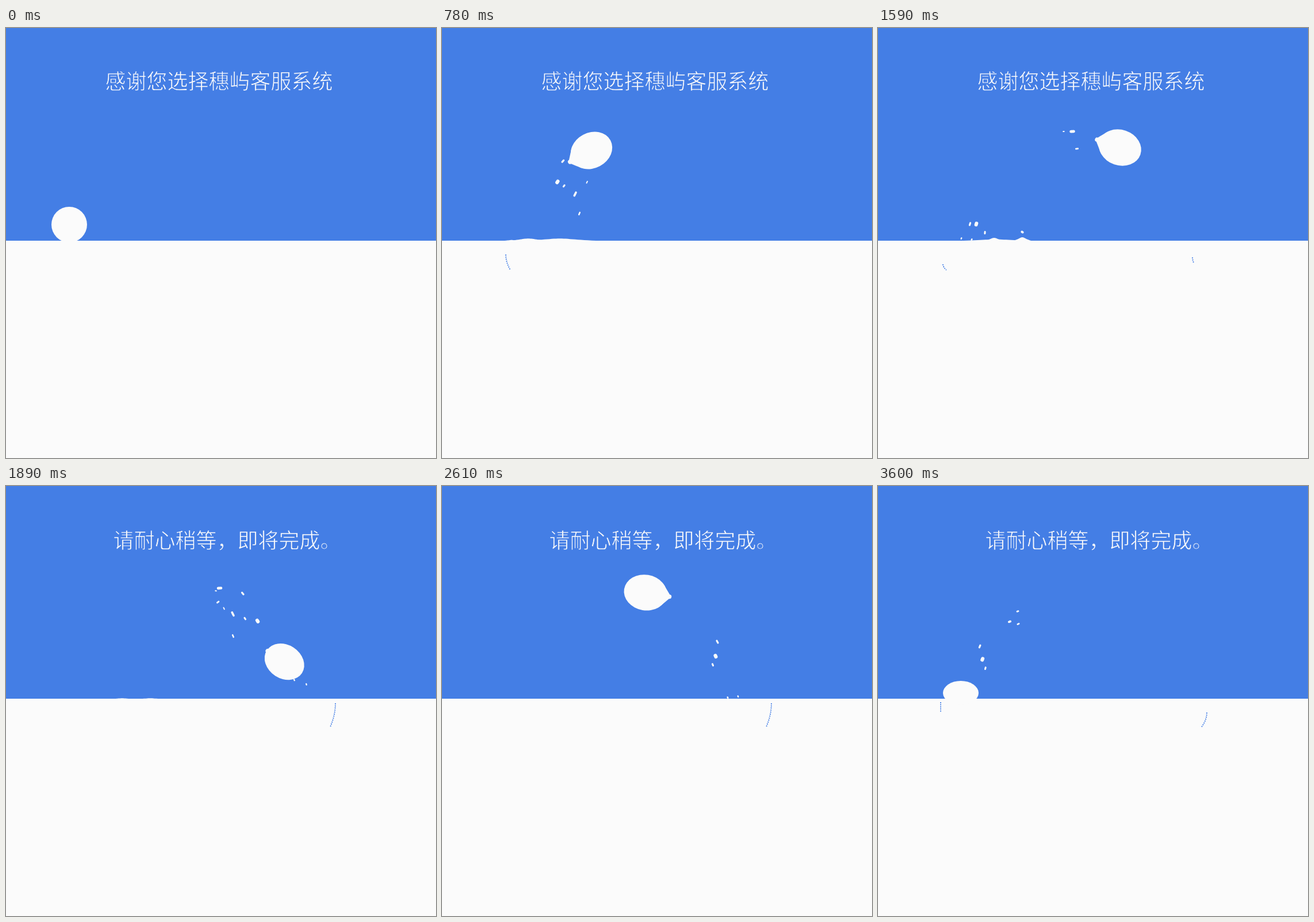
Write an HTML page with a canvas that moves like this. It is 748 px wide and 748 px high and loops after 3.63 s.

```html
<!DOCTYPE html>
<html lang="zh-CN">
<head>
<meta charset="utf-8">
<title>请稍等</title>
<style>
  html, body { margin: 0; width: 100%; height: 100%; overflow: hidden; background: #fbfbfb; }
  canvas, svg { position: absolute; left: 0; top: 0; width: 748px; height: 748px; }
  text {
    font: 300 36px "Noto Sans CJK SC", "Noto Sans CJK", "Noto Sans SC", sans-serif;
    fill: #fbfbfb; fill-opacity: .9;
  }
  .thin text { stroke: #447ee5; stroke-width: .8px; fill-opacity: 1; }
</style>
</head>
<body>
<canvas width="748" height="748"></canvas>
<svg viewBox="0 0 748 748">
  <text id="thanks" x="172.5" y="106">感谢您选择穗屿客服系统</text>
  <text id="wait" x="186.5" y="107.5">请耐心稍等，即将完成。</text>
</svg>
<script>
const BLUE = '#447ee5', WHITE = '#fbfbfb', LEVEL = 370, AXIS = 330, LOOP = 3630;
const ctx = document.querySelector('canvas').getContext('2d');
const thanks = document.getElementById('thanks'), wait = document.getElementById('wait');
const clamp = v => Math.max(0, Math.min(1, v));
const mix = (a, b, u) => a + (b - a) * u;

// smooth interpolation of all columns; straight on beyond the ends
function sample(keys, t) {
  const last = keys.length - 1;
  let i = 0;
  while (i < last - 1 && t >= keys[i + 1][0]) i++;
  const a = keys[i], b = keys[i + 1], p = keys[i - 1] || a, n = keys[i + 2] || b;
  const h = b[0] - a[0], u = (t - a[0]) / h;
  return a.slice(1).map((v, k) => {
    const c = k + 1, d = b[c] - v;
    if (u < 0 || u > 1) return v + d * u;
    const m0 = (b[c] - p[c]) / (b[0] - p[0]) * h;
    const m1 = (n[c] - v) / (n[0] - a[0]) * h;
    return v + u * (m0 + u * (3 * d - 2 * m0 - m1 + u * (m0 + m1 - 2 * d)));
  });
}

// step, x, y, tilt in degrees
const rightward = [
  [0, 110, 342, 0], [5, 107, 404, -40], [11, 138, 368, -56], [16, 180, 288, -50],
  [25, 260, 213, -28], [36, 338, 184, 0], [52, 421, 208, 19], [67, 517, 362, 40]
];

function ball(keys, t, tailFrom, side) {
  const first = keys[0][0], end = keys[keys.length - 1][0];
  if (t < first || t > end + 2) return;
  const [x, y, tilt] = sample(keys, t);
  const grow = clamp((t - first) / 6), land = clamp((end - t) / 6);
  const rx = mix(31, 37.5, grow * land), ry = mix(21, 31, land);
  const rot = tilt * Math.PI / 180 * clamp((end - t) / 2);
  ctx.beginPath();
  ctx.ellipse(x, y, rx, ry, rot, 0, 7);
  ctx.fill();

  const dist = 46 * clamp((t - tailFrom) / 8) * land;
  if (dist < 28) return;
  ctx.save();
  ctx.translate(x, y);
  ctx.rotate(rot);
  ctx.scale(side, 1);
  const r = 3.8, cx = r - dist;
  ctx.beginPath();
  ctx.moveTo(-rx * .74, -ry * .67);
  ctx.quadraticCurveTo(-rx, -ry * .3, cx, -r);
  ctx.arc(cx, 0, r, -Math.PI / 2, Math.PI / 2, true);
  ctx.quadraticCurveTo(-rx, ry * .3, -rx * .74, ry * .67);
  ctx.fill();
  ctx.restore();
}

const leftward = [
  [63, 545, 412, 60], [67, 524, 342, 58], [71, 480.5, 270, 45], [80, 401, 205, 25],
  [88, 340, 184, 5], [102, 256, 205, -20], [119, 144, 360, -40]
];

function stroke(x, y, a, len, width) {
  const dx = Math.cos(a) * len / 2, dy = Math.sin(a) * len / 2;
  ctx.lineWidth = width;
  ctx.beginPath();
  ctx.moveTo(x - dx, y - dy);
  ctx.lineTo(x + dx + .01, y + dy);
  ctx.stroke();
}

// each row: length, width, then one x, y pair per step
function drops(rows, steps, from, to, t, mirror) {
  if (t < from || t > to) return;
  ctx.save();
  if (mirror) ctx.transform(-1, 0, 0, 1, 2 * AXIS, 0);
  for (const [len, width, ...xy] of rows) {
    const count = xy.length / 2;
    if (count < steps.length && t > steps[count - 1] - 2) continue;
    const keys = steps.slice(0, count).map((s, i) => [s, xy[2 * i], xy[2 * i + 1]]);
    const [x, y] = sample(keys, t), [nx, ny] = sample(keys, t + .1);
    stroke(x, y, Math.atan2(ny - y, nx - x), len, width);
  }
  ctx.restore();
}

const spray = [
  [3, 2, 272, 230, 228, 315],
  [6, 3.6, 255, 243, 203, 345],
  [4, 2.6, 257, 280, 217, 375],
  [3, 3, 235, 244, 189, 311, 186, 356],
  [2.5, 6, 216, 245, 184, 296, 171, 341],
  [4, 3.2, 237, 201, 181, 271, 160, 341]
];
const splash = (t, mirror) => drops(spray, [16, 36, 52], 12, 60, t, mirror);

const beads = [[1.5, 2.6, 178, 338, 163, 368], [1.5, 2.4, 154, 347, 145, 366], [1.5, 2.4, 135, 354, 130, 372]];
const dribble = (t, mirror) => drops(beads, [36, 52], 28, 58, t, mirror);

const trailOut = [
  [5, 4.6, 242, 186, 338, 180, 396, 176],
  [3, 3, 257, 202, 346, 210, 382, 192],
  [1.5, 2, 242, 201, 323, 180, 401, 188]
];
const trailBack = [[2, 3, 312, 194, 243, 218], [2.5, 3.8, 311, 207, 229, 236], [2.5, 2.8, 297, 216, 244, 240]];

// loose drops: step, x, y, width
function strays(t) {
  for (const [s, x, y, w] of [
    [16, 147, 336, 4], [36, 226, 327, 4.6], [52, 251, 355, 4], [71, 344, 170, 5], [71, 514, 313, 6]
  ]) if (Math.abs(t - s) < 4) stroke(x, y + t - s, .6, 1.5, w);
}

function atLevel(u, trace) {
  if (u <= 0) return;
  ctx.save();
  ctx.translate(0, LEVEL);
  ctx.scale(1, u * (2 - u));
  ctx.beginPath();
  trace();
  ctx.fill();
  ctx.restore();
}

// column of liquid: l..r is its base, a and b bend the left flank, c and d the right one
function jet(t, peak, l, a, b, tip, height, c, d, r) {
  const u = 1 - Math.abs(t - peak) / (t < peak ? 6.5 : 9);
  atLevel(u, () => {
    ctx.moveTo(l, 1);
    ctx.bezierCurveTo(a, -3, b, -14, tip - 4, 3 - height);
    ctx.quadraticCurveTo(tip, -height - 3, tip + 4, 3 - height);
    ctx.bezierCurveTo(c, -height / 2, d, -3, r, 1);
  });
}

// ripples: peak step, x, height, half width
function ripples(t) {
  for (const [peak, x, h, w] of [
    [16, 121, 12, 15], [16, 163, 9, 12], [36, 116, 6, 14], [36, 150, 8, 48], [36, 205, 5, 90],
    [52, 202, 5, 24], [52, 251, 6, 22], [102, 202, 7, 16], [102, 482, 7, 18], [102, 397, 2, 22]
  ]) {
    atLevel(1 - Math.abs(t - peak) / (7 + w / 6), () => {
      ctx.moveTo(x - w, 1);
      ctx.bezierCurveTo(x - w * .4, 0, x - w * .2, -h, x, -h);
      ctx.bezierCurveTo(x + w * .2, -h, x + w * .4, 0, x + w, 1);
    });
  }
}

// dotted blue marks under the water line: from, to, start, end
function flecks(t) {
  ctx.save();
  ctx.strokeStyle = BLUE;
  ctx.lineCap = 'butt';
  ctx.lineWidth = 1.8;
  ctx.setLineDash([2, 1.6]);
  for (const [from, to, x, y, ex, ey] of [
    [14, 20, 139, 391, 145, 399], [21, 44, 111, 394, 119, 421], [45, 60, 113, 411, 119, 421],
    [50, 60, 547, 399, 549, 408], [61, 90, 573, 378, 564, 419], [91, 120, 572, 394, 563, 419],
    [98, 120, 109, 376, 109, 393]
  ]) {
    if (t < from || t >= to) continue;
    ctx.beginPath();
    ctx.moveTo(x, y);
    ctx.quadraticCurveTo(x, (y + ey) / 2, ex, ey);
    ctx.stroke();
  }
  ctx.restore();
}

function draw(t) {
  ctx.fillStyle = BLUE;
  ctx.fillRect(0, 0, 748, LEVEL);
  ctx.fillStyle = ctx.strokeStyle = WHITE;
  ctx.fillRect(0, LEVEL, 748, 748 - LEVEL);
  ctx.lineCap = 'round';

  jet(t, 16, 55, 120, 141, 146, 29, 146, 150, 220);
  jet(t, 71, 455, 530, 540, 530, 47, 545, 556, 625);
  ripples(t);
  ball(rightward, t, 4, 1);
  ball(leftward, t, 72, -1);
  if (t > 68 && t < 75) stroke(463, 295, .25, 20, 6);

  splash(t);
  splash(t - 50, true);
  splash(t - 81);
  dribble(t);
  dribble(t - 34, true);
  drops(trailOut, [36, 52, 71], 26, 84, t);
  drops(trailBack, [102, 119], 88, 120, t);
  strays(t);
  flecks(t);

  thanks.style.visibility = t < 60 ? 'visible' : 'hidden';
  wait.style.visibility = t < 60 ? 'hidden' : 'visible';
}

// without a light cut, Latin widths of both weights agree: thin the strokes instead
const widthAt = weight => {
  ctx.font = weight + ' 36px "Noto Sans CJK SC", sans-serif';
  return ctx.measureText('mmmmWWWW').width;
};
if (widthAt(300) === widthAt(400)) document.querySelector('svg').classList.add('thin');

const start = performance.now();
function tick() {
  const ms = (performance.now() - start) % LOOP;
  draw(ms < 60 ? 0 : 1 + Math.floor((ms - 60) / 30));
  requestAnimationFrame(tick);
}
tick();
</script>
</body>
</html>
```
